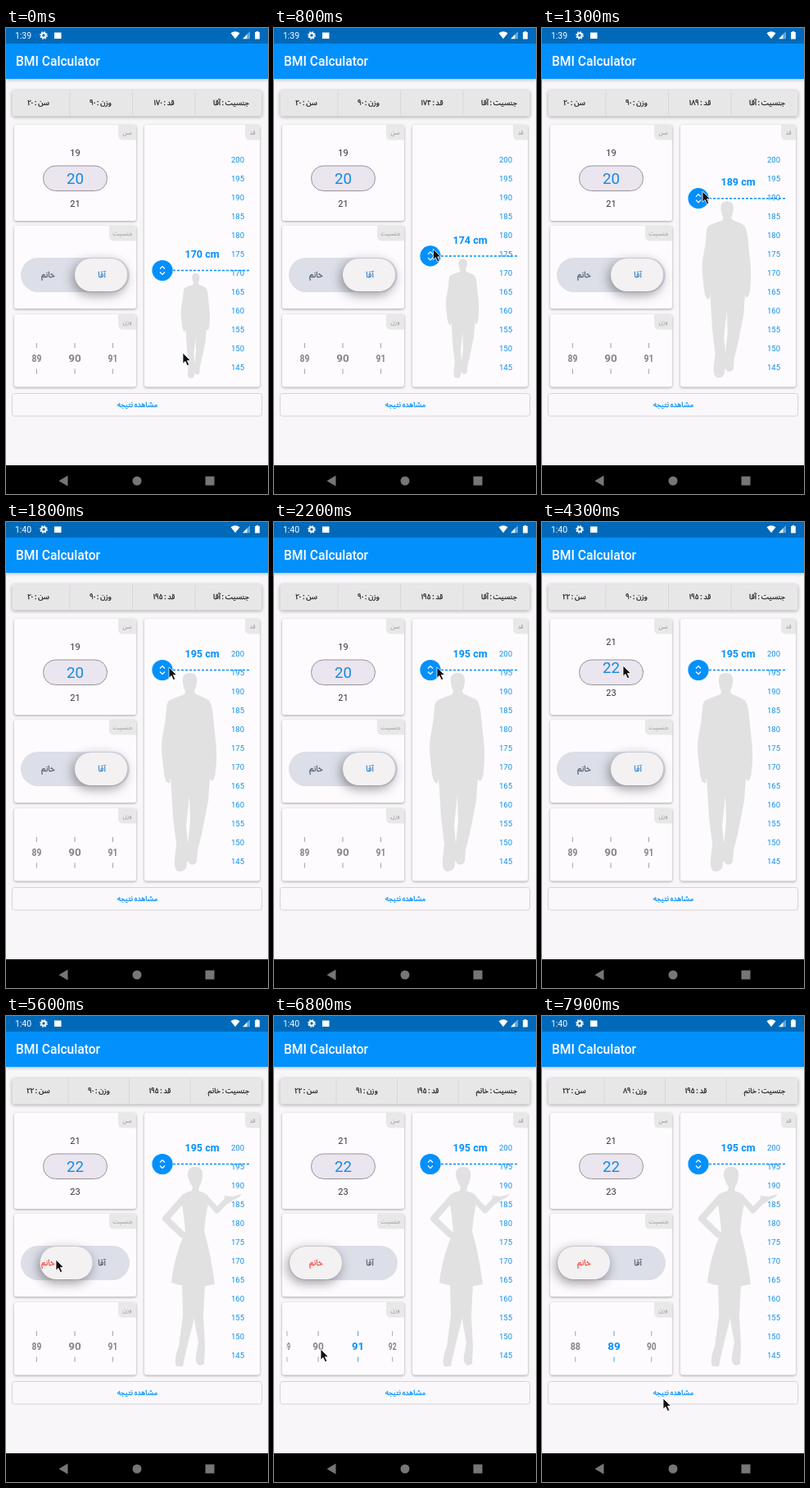
Write an HTML page that moves like this. It is 320 px wide and 568 px high and loops after 8 s.

```html
<!DOCTYPE html>
<html lang="fa">
<head>
<meta charset="utf-8">
<title>BMI Calculator</title>
<style>
html, body { margin: 0; width: 100%; height: 100%; overflow: hidden; background: #f8f6f8; }
svg { display: block; width: 320px; height: 568px; }
text { font-family: Roboto, sans-serif; text-anchor: middle; }
.fa {
  font: 9px "Noto Sans Arabic", "DejaVu Sans", sans-serif; direction: rtl; word-spacing: -.6px;
  color: #252525; fill: currentColor; stroke: currentColor; stroke-width: .3px;
}
.card { fill: #fdfbfe; filter: drop-shadow(0 1.3px 1.7px #0005); }
.summary { fill: #e8e7e8; filter: drop-shadow(0 1px 2px #0005); }
.tag { fill: #e9e8e9; }
.tagText { font-size: 7.4px; color: #959495; stroke: none; }
.option { font-size: 9.6px; }
.scale { font-size: 9.5px; fill: #0d90ec; }
.thumb { fill: #f3f1f2; filter: drop-shadow(-2px 4px 7px #0006); }
.weight { font-weight: bold; }
</style>
</head>
<body>
<svg viewBox="0 0 320 568">
  <defs>
    <clipPath id="ageClip"><rect x="14" y="134" width="122" height="96"/></clipPath>
    <clipPath id="weightClip"><rect x="15" y="370" width="139" height="62"/></clipPath>
  </defs>
  <rect width="320" height="568" fill="#f8f6f8"/>

  <rect y="18" width="320" height="44" fill="#0290fd" style="filter:drop-shadow(0 1.5px 2px #0004)"/>
  <rect width="320" height="19" fill="#0169b9"/>
  <text id="clock" x="21" y="12.8" font-size="10.5" fill="#fff"></text>
  <circle cx="46" cy="9" r="2.7" fill="none" stroke="#fff" stroke-width="2"/>
  <circle cx="46" cy="9" r="4.2" fill="none" stroke="#fff" stroke-width="1.3" stroke-dasharray="1.7 1.6"/>
  <rect x="59" y="5.5" width="8.5" height="7.5" fill="#fff"/>
  <path fill="#fff" d="M274.5 6.2Q280 2.3 285.5 6.2L280 13.2ZM289 13.3H294.5V7.5ZM304 5H305.6V4H308.2V5H309.8V13.4H304Z"/>
  <path fill="#fff" opacity=".4" d="M294.5 13.3V7.5L298 4V13.3Z"/>
  <text x="12" y="45.7" font-size="15.6" font-weight="500" fill="#fff" style="text-anchor:start">BMI Calculator</text>

  <rect class="summary" x="7.5" y="76" width="305" height="31.5" rx="3"/>
  <g id="summary"></g>

  <g id="cards"></g>

  <rect x="45.5" y="168" width="78" height="30.5" rx="15" fill="#ebe5ef" stroke="#8d8990" stroke-width=".9"/>
  <g clip-path="url(#ageClip)" id="age"></g>

  <rect x="18" y="280" width="133" height="42" rx="21" fill="#dcdee8"/>
  <rect id="thumb" class="thumb" y="281" width="64" height="40" rx="20"/>
  <text id="female" class="fa option" x="51.5" y="303.5">خانم</text>
  <text id="male" class="fa option" x="117" y="303.5">آقا</text>

  <g clip-path="url(#weightClip)" id="weight"></g>

  <g id="figure" fill="#e2e1e2" stroke="#e2e1e2">
    <path id="man" stroke="none" d="M224 184C217 184 215 189 216 196Q217 203 219 206L218 210C211 213 203 215 199 218C195 222 196 229 195 238C194 250 190 261 190 274C190 286 192 297 193 307C194 314 197 320 200 318L201 311L204 360L208 393L206 410C205 421 207 426 213 426Q221 426 221 415L222 412C222 418 230 420 233 414L234 400L239 380L247 340L249 312C251 321 256 312 256 303C258 287 257 272 255 257C253 240 253 227 249 219C246 214 237 213 231 209L230 206Q232 202 233 196C234 188 231 184 224 184ZM224 334L225 365L222 392L220 370Z"/>
    <g id="woman">
      <path fill="none" stroke-width="8" stroke-linejoin="round" stroke-linecap="round" d="M218 221L195 247L215 266"/>
      <path fill="none" stroke-width="7" stroke-linejoin="round" stroke-linecap="round" d="M243 221L258 237L270 224"/>
      <path stroke="none" d="M266 219L277 220L288 217Q285 222 278 224L271 229Z"/>
      <path stroke="none" d="M231 184C224 183 220 190 223 198Q225 205 228 208L227 213C219 215 214 217 214 224L217 243L219 262C211 281 204 304 202 325Q228 334 255 327C252 304 248 283 242 262L244 245L248 222C246 216 240 215 235 213L236 208Q239 204 240 196C241 188 238 184 231 184Z"/>
      <path stroke="none" d="M215 326L216 365L211 403C206 415 206 423 208 427L216 427L220 408L229 372L233 328ZM229 328L229 365L235 398L232 414C231 421 233 425 237 426L242 424L243 402L241 365L243 328Z"/>
    </g>
  </g>
  <g id="scale"></g>
  <g id="slider">
    <text id="height" x="239.5" y="-15.2" font-size="12.5" font-weight="bold" fill="#0290fd"></text>
    <path d="M204 0H299" stroke="#0290fd" stroke-width="1.5" stroke-dasharray="3 2"/>
    <circle cx="191" r="12.6" fill="#0290fd"/>
    <path d="M188 -2L191 -5L194 -2M188 2L191 5L194 2" fill="none" stroke="#fff" stroke-width="1.2"/>
  </g>

  <rect x="7.5" y="445.5" width="305" height="27.5" rx="3" fill="#faf8fa" stroke="#d6d4d6"/>
  <text class="fa" x="160.5" y="461.5" style="color:#0290fd">مشاهده نتیجه</text>

  <rect y="533" width="320" height="35" fill="#000"/>
  <path d="M64.5 552L75.5 545.5V558.5Z" fill="#767676"/>
  <circle cx="160" cy="552" r="5.5" fill="#767676"/>
  <rect x="243.5" y="546.5" width="11" height="11" fill="#767676"/>

  <path id="cursor" d="M0 0V13.2L3 10.4L5.4 15.6L7.8 14.5L5.4 9.5H9.5Z" fill="#111" stroke="#fff" stroke-width=".8"/>
</svg>
<script>
const $ = id => document.getElementById(id);
const BLUE = '#0290fd', SLATE = '#4a5a68';
const PERIOD = 8000, TOGGLE = 5420, CLOCK_TICK = 1700, WEIGHT_DRAG = 6350;

// Tracks are lists of [time, value, ...].
const cursorKeys = [
  [0, 216, 396], [500, 194, 287], [600, 194, 287], [1300, 196, 199], [1750, 199, 177], [2250, 199, 177],
  [2850, 98, 200], [3000, 98, 200], [3400, 98, 166], [3700, 98, 206], [4100, 99, 172], [4300, 99, 175],
  [4600, 99, 175], [5300, 61, 297], [5750, 61, 297], [6250, 86, 405], [WEIGHT_DRAG, 86, 405],
  [6800, 57, 406], [7300, 138, 405], [7400, 138, 405], [7850, 148, 466]
];
const heightKeys = [[600, 170], [1300, 189.1], [1750, 195]];
const ageKeys = [[3000, 20], [3400, 21.1], [3700, 21], [4100, 22.28], [4300, 22.19], [4500, 22]];
const thumbKeys = [[TOGGLE, 84], [TOGGLE + 300, 19]];
const weightKeys = [[WEIGHT_DRAG, 90], [6800, 90.62], [7300, 88.92]];

function at(keys, t) {
  const i = keys.findIndex(k => k[0] > t);
  if (i === 0) return keys[0].slice(1);
  if (i < 0) return keys[keys.length - 1].slice(1);
  const a = keys[i - 1], b = keys[i];
  const u = (t - a[0]) / (b[0] - a[0]), e = u * u * (3 - 2 * u);
  return a.slice(1).map((v, k) => v + (b[k + 1] - v) * e);
}

const persian = n => String(n).replace(/\d/g, d => '۰۱۲۳۴۵۶۷۸۹'[d]);
const range = (from, to) => Array.from({ length: to - from + 1 }, (_, i) => from + i);

function card(x, y, w, h, label, tagW) {
  const r = x + w;
  return `<rect class="card" x="${x}" y="${y}" width="${w}" height="${h}" rx="3"/>
    <path class="tag" d="M${r - tagW} ${y}H${r - 3}q3 0 3 3V${y + 18.5}H${r - tagW + 6}q-6 0 -6 -6Z"/>
    <text class="fa tagText" x="${r - tagW / 2}" y="${y + 11.5}">${label}</text>`;
}

$('cards').innerHTML =
  card(10, 118, 149, 117, 'سن', 22) + card(10, 241, 149, 101, 'جنسیت', 33) +
  card(10, 349, 149, 88.5, 'وزن', 22) + card(169, 118, 141, 319.5, 'قد', 18);

$('scale').innerHTML = range(0, 11).map(i =>
  `<text class="scale" x="283" y="${164.3 + i * 22.95}">${200 - i * 5}</text>`).join('');

function drawSummary(isMale, height, weight, age) {
  const shift = isMale ? 0 : 1;
  const cells = [
    [275 - 3 * shift, 'جنسیت : ' + (isMale ? 'آقا' : 'خانم')],
    [193 - 5 * shift, 'قد : ' + persian(height)],
    [115.5 - 2 * shift, 'وزن : ' + persian(weight)],
    [39.5, 'سن : ' + persian(age)]
  ];
  $('summary').innerHTML =
    cells.map(([x, s]) => `<text class="fa" x="${x}" y="94">${s}</text>`).join('') +
    [78, 154.5, 231].map((x, i) =>
      `<path d="M${x - 2 * shift * (i + 1)} 76V107.5" stroke="#d9d8d9"/>`).join('');
}

function drawAge(value) {
  const selected = Math.round(value);
  $('age').innerHTML = range(18, 24).map(n => {
    const on = n === selected, size = on ? 18.7 : 11;
    return `<text x="84.5" y="${183.2 + (n - value) * 31.3 + size * .355}" font-size="${size}" fill="${on ? '#1689e0' : '#333'}">${n}</text>`;
  }).join('');
}

// Numbers sit on a horizontal cylinder.
function drawWeight(value, touched) {
  const selected = Math.round(value);
  $('weight').innerHTML = range(selected - 2, selected + 2).map(n => {
    const angle = (n - value) * .6, on = n === selected;
    const x = 84 + 82.4 * Math.sin(angle), sx = Math.max(0, Math.cos(angle));
    const color = touched && on ? BLUE : '#858487';
    return `<g transform="translate(${x} 0) scale(${sx} 1)" fill="${color}">
      <path d="M0 384V390M0 415.5V421.5" stroke="${color}" stroke-width=".8"/>
      <text class="weight" y="407" font-size="${on ? 13.5 : 12.6}">${n}</text></g>`;
  }).join('');
}

function draw(t) {
  const [height] = at(heightKeys, t), [age] = at(ageKeys, t), [weight] = at(weightKeys, t);
  const isMale = t < TOGGLE;
  const lineY = 295.5 - (height - 170) * 4.6;
  const size = (428 - lineY - 3.5) / 244;

  $('clock').textContent = t < CLOCK_TICK ? '1:39' : '1:40';
  drawSummary(isMale, Math.round(height), Math.round(weight), Math.round(age));
  drawAge(age);
  drawWeight(weight, t > WEIGHT_DRAG);

  $('thumb').setAttribute('x', at(thumbKeys, t)[0]);
  $('male').style.color = isMale ? '#2f7fc4' : SLATE;
  $('female').style.color = isMale ? SLATE : '#f44336';

  $('man').style.display = isMale ? '' : 'none';
  $('woman').style.display = isMale ? 'none' : '';
  $('figure').setAttribute('transform', `translate(240 428) scale(${size}) translate(-240 -428)`);
  $('slider').setAttribute('transform', `translate(0 ${lineY})`);
  $('height').textContent = Math.round(height) + ' cm';
  $('cursor').setAttribute('transform', `translate(${at(cursorKeys, t)})`);
}

const start = performance.now();
function frame() {
  draw((performance.now() - start) % PERIOD);
  requestAnimationFrame(frame);
}
frame();
</script>
</body>
</html>
```
